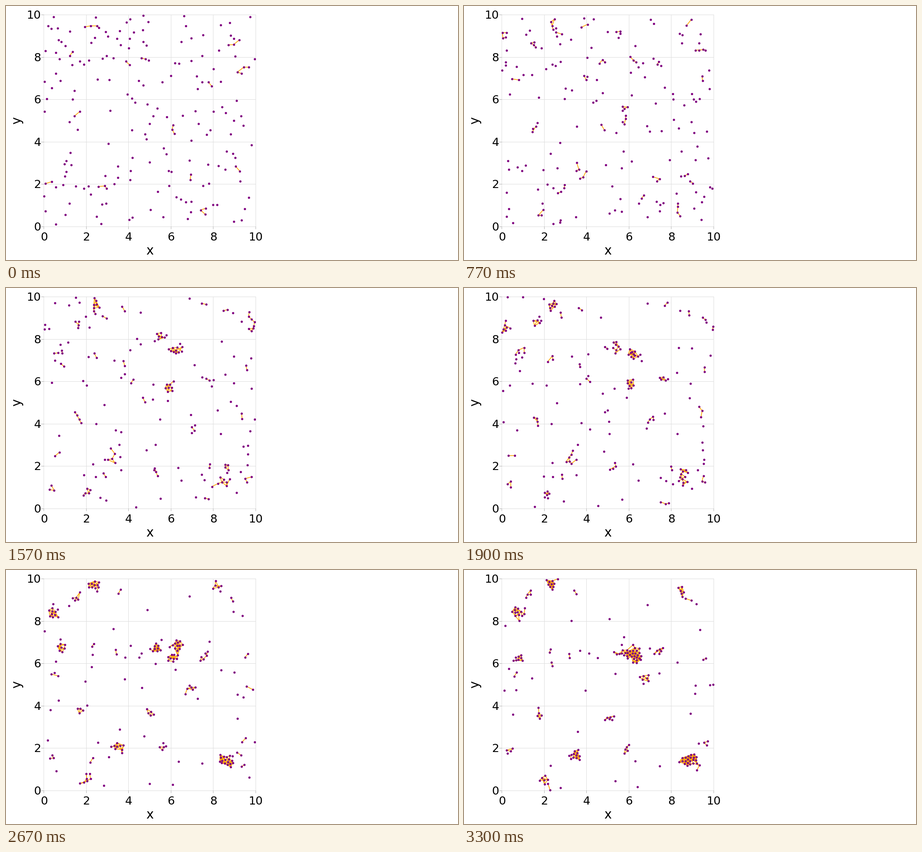
Write a matplotlib script that moves like this. It is 998x561 px and loops after 3.33 s.

```python
import numpy as np
import matplotlib.pyplot as plt
from matplotlib.animation import FuncAnimation
from matplotlib.collections import LineCollection

WIDTH, HEIGHT, DPI = 998, 561, 100
FRAMES, INTERVAL = 100, 33.3
PT = 72 / DPI                       # points per pixel

BOX, COUNT, SUBSTEPS = 10.0, 200, 4
CORE, REACH, DEPTH = 0.15, 0.40, 4e-4   # pair potential
STIFF, FRICTION = 1.0, 0.006
PULL, DRAG, HEAT = 0.012, 0.15, 0.010   # cluster thermostat
SPEED, TOP_SPEED, SPACING = 0.022, 0.06, 0.12
LOOKAHEAD, SEED_SIZE, LAST = 12, 4, FRAMES - 1

# Drifting droplets: first and last time, start, end, final size
DROPLETS = [
    (0, LAST, (9.20, 8.38), (10.75, 8.40), 13),
    (0, LAST, (6.15, 8.20), (6.28, 6.45), 18),
    (0, LAST, (5.80, 5.35), (6.28, 6.45), 10),
    (13, 72, (5.70, 9.70), (5.20, 6.70), 11),
    (10, LAST, (2.00, 0.80), (2.00, 0.45), 7),
    (34, LAST, (3.20, 2.50), (3.45, 1.60), 12),
    (34, LAST, (8.45, 1.00), (8.95, 1.50), 8),
    (34, LAST, (7.15, 3.60), (6.75, 5.40), 9),
    (50, LAST, (4.85, 4.20), (5.15, 3.55), 6),
    (30, LAST, (0.75, 7.80), (0.85, 6.20), 7),
    (34, LAST, (7.80, 6.10), (7.45, 6.40), 7),
    (45, LAST, (5.20, 1.85), (5.90, 2.00), 5),
]
rng = np.random.default_rng(12)


def wrap(d):
    return d - BOX * np.round(d / BOX)


def start_points():
    pts = rng.uniform(0, BOX, (1, 2))
    while len(pts) < COUNT:
        p = rng.uniform(0, BOX, 2)
        if np.hypot(*wrap(pts - p).T).min() > SPACING:
            pts = np.vstack([pts, p])
    return pts


def droplet_at(drop, t):
    """Centre and size of a droplet at time t."""
    born, gone, start, end, size = drop
    u = (t - born) / (gone - born)
    centre = np.array(start) + np.clip(u, 0, 1) * np.subtract(end, start)
    count = round(SEED_SIZE + (size - SEED_SIZE) * u) if 0 <= u <= 1 else 0
    return centre, count


def staff(now, goal, pos, vel, owner, arrive):
    """Steer the nearest free particles to each droplet, release any excess."""
    for g, drop in enumerate(DROPLETS):
        centre, want = droplet_at(drop, goal)
        members = np.flatnonzero(owner == g)
        extra = members[want:]
        owner[extra] = -1
        vel[extra] = rng.normal(0, SPEED, (len(extra), 2))
        if want <= len(members):
            continue
        free = np.flatnonzero(owner < 0)
        gap = wrap(centre - pos[free])
        near = np.argsort(np.hypot(*gap.T))[:want - len(members)]
        pick = free[near]
        owner[pick], arrive[pick] = g, goal
        if goal > now:
            v = gap[near] / (goal - now)
            speed = np.hypot(*v.T)[:, None] + 1e-9
            vel[pick] = v * np.minimum(1, TOP_SPEED / speed)


def pair_forces(pos, vel):
    d = wrap(pos[:, None] - pos[None])
    r = np.hypot(d[..., 0], d[..., 1]) + 1e-9
    np.fill_diagonal(r, BOX)
    near = (r < REACH).astype(float)
    tension = 2 * DEPTH * (REACH - r) / (REACH - CORE) ** 2
    push = np.where(r < CORE, STIFF * (CORE - r), -tension) * near
    acc = ((push / r)[..., None] * d).sum(axis=1)
    return acc + FRICTION * (near @ vel - near.sum(1)[:, None] * vel)


def simulate():
    pos = start_points()
    vel = rng.normal(0, SPEED, (COUNT, 2))
    owner = np.full(COUNT, -1)
    arrive = np.zeros(COUNT)
    dt = 1 / SUBSTEPS
    states = []
    staff(0, 0, pos, vel, owner, arrive)
    for f in range(FRAMES):
        if f % LOOKAHEAD == 0:
            staff(f, min(f + LOOKAHEAD, LAST), pos, vel, owner, arrive)
        states.append((pos.copy(), vel.copy()))
        mid = np.array([droplet_at(d, f)[0] for d in DROPLETS])
        drift = np.array([droplet_at(d, f + 1)[0] for d in DROPLETS]) - mid
        held = np.flatnonzero((owner >= 0) & (arrive <= f))
        group = owner[held]
        for _ in range(SUBSTEPS):
            acc = pair_forces(pos, vel)
            gap = np.clip(wrap(mid[group] - pos[held]), -0.25, 0.25)
            acc[held] += PULL * gap + DRAG * (drift[group] - vel[held])
            vel += acc * dt
            vel[held] += rng.normal(0, HEAT * dt ** 0.5, (len(held), 2))
            pos = (pos + vel * dt) % BOX
    return states


def bonds(pos, vel):
    """Pairs whose relative energy is negative."""
    i, j = np.triu_indices(COUNT, 1)
    r = np.hypot(*(pos[i] - pos[j]).T)
    kinetic = 0.25 * ((vel[i] - vel[j]) ** 2).sum(1)
    bound = kinetic < DEPTH * np.minimum(1, (REACH - r) / (REACH - CORE))
    return i[bound], j[bound]


LEFT, BOTTOM, UNIT = 83.5, 486.5, 46.75
TOP, RIGHT = BOTTOM - BOX * UNIT, LEFT + BOX * UNIT
TICK = 5


def to_px(p):
    return np.column_stack([LEFT + UNIT * p[:, 0], BOTTOM - UNIT * p[:, 1]])


plt.rcParams["font.family"] = "DejaVu Sans"
fig = plt.figure(figsize=(WIDTH / DPI, HEIGHT / DPI), dpi=DPI, facecolor="white")
ax = fig.add_axes([0, 0, 1, 1])
ax.set_xlim(0, WIDTH)
ax.set_ylim(HEIGHT, 0)
ax.axis("off")


def rule(xs, ys, color):
    ax.plot(xs, ys, color=color, lw=PT, zorder=1)


for n in range(0, 11, 2):
    x, y = LEFT + UNIT * n, BOTTOM - UNIT * n
    rule([x, x], [BOTTOM, TOP], "#dedede")
    rule([LEFT, RIGHT], [y, y], "#dedede")
    rule([x, x], [BOTTOM, BOTTOM + TICK], "#b4b4b4")
    rule([LEFT - TICK, LEFT], [y, y], "#b4b4b4")
    ax.text(x + 0.5, 518.5, str(n), size=18, ha="center", va="baseline")
    ax.text(77.5, y + 9, str(n), size=18, ha="right", va="baseline")
ax.text(317.5, 548.6, "x", size=20, ha="center", va="baseline")
ax.text(32, 252.5, "y", size=20, ha="center", va="baseline",
        rotation=90, rotation_mode="anchor")

links = LineCollection([], colors="#ffa500", linewidths=1.6 * PT, zorder=2)
ax.add_collection(links, autolim=False)
dots, = ax.plot([], [], "o", color="#800080", ms=5 * PT, mew=0, zorder=3)

states = simulate()


def update(f):
    pos, vel = states[f]
    px = to_px(pos)
    i, j = bonds(pos, vel)
    links.set_segments(np.stack([px[i], px[j]], axis=1))
    dots.set_data(px[:, 0], px[:, 1])
    return links, dots


anim = FuncAnimation(fig, update, frames=FRAMES, interval=INTERVAL,
                     repeat=True, repeat_delay=0, blit=False)
plt.show()
```
